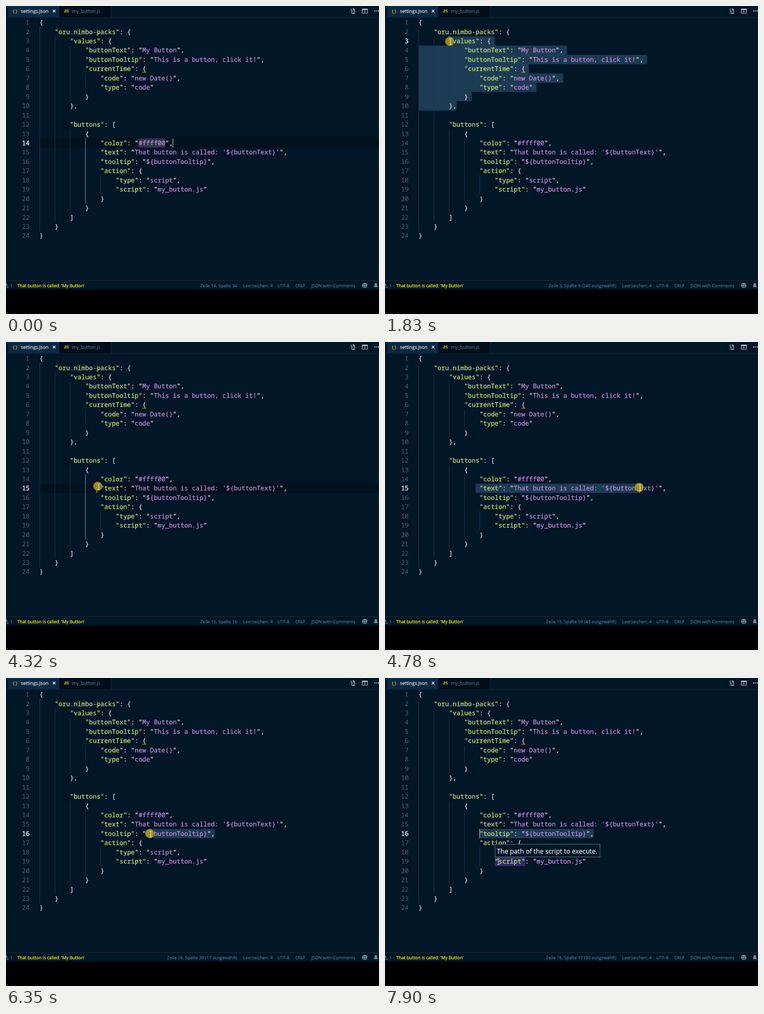
Animation, 825 px wide and 679 px high, one loop 8000 ms. Source, as an HTML page:

```html
<!DOCTYPE html>
<html lang="de">
<head>
<meta charset="utf-8">
<title>Editor</title>
<style>
html, body { margin: 0; width: 100%; height: 100%; overflow: hidden; background: #000; }
svg { display: block; }
text { white-space: pre; text-rendering: geometricPrecision; }
text, tspan { fill: currentColor; stroke: currentColor; stroke-width: .25px; }
.code { font: 14.05px "Noto Sans Mono", monospace; color: #dde5ee; }
.num { text-anchor: end; color: #4b6479; stroke-width: 0; }
.num.on { color: #e4f0fa; stroke-width: .45px; }
.key { color: #c5e478; }
.str { color: #cd89de; }
.quo { color: #e2f5e4; }
.ui { font: 9.75px "Open Sans", sans-serif; color: #5f7e97; stroke-width: .1px; }
.tab { font-size: 10.4px; }
.bright { stroke-width: .25px; }
.tip { font-size: 14.53px; color: #e6ecf2; }
</style>
</head>
<body>
<svg id="stage" width="825" height="679" viewBox="0 0 825 679"></svg>
<script>
const LOOP = 8000, X0 = 74, Y0 = 26, CW = 8.43, LH = 20.45;
const stage = document.getElementById('stage');

const source = `{
    "oru.nimbo-packs": {
        "values": {
            "buttonText": "My Button",
            "buttonTooltip": "This is a button, click it!",
            "currentTime": {
                "code": "new Date()",
                "type": "code"
            }
        },

        "buttons": [
            {
                "color": "#ffff00",
                "text": "That button is called: '\${buttonText}'",
                "tooltip": "\${buttonTooltip}",
                "action": {
                    "type": "script",
                    "script": "my_button.js"
                }
            }
        ]
    }
}`.split('\n');
const levels = source.map(s => s ? s.search(/\S/) / 4 : 2);

const colX = c => X0 + c * CW;
const lineY = n => Y0 + (n - 1) * LH;

function add(tag, attrs, parent = stage, content) {
  const el = document.createElementNS('http://www.w3.org/2000/svg', tag);
  for (const k in attrs) el.setAttribute(k, attrs[k]);
  if (content !== undefined) el.textContent = content;
  parent.appendChild(el);
  return el;
}
const rect = (x, y, width, height, fill, parent) => add('rect', { x, y, width, height, fill }, parent);
const label = (x, y, s, cls = 'ui', more = {}) => add('text', { x, y, class: cls, ...more }, stage, s);
const line = (d, stroke, w = 1, parent) =>
  add('path', { d, stroke, 'stroke-width': w, fill: 'none' }, parent);
const show = (el, on) => el.setAttribute('visibility', on ? 'visible' : 'hidden');

// Window and tabs
rect(0, 0, 825, 625, '#011627');
rect(0, 24.5, 825, 1, '#1c2737');
rect(5, 0, 113, 24.5, '#0b2942');
rect(118, 0, 114, 24.5, '#010e1a');
rect(232, 0, 1, 24.5, '#272b3b');
label(15, 14.5, '{ }', 'ui', { style: 'font-weight:600;color:#cbcb41' });
label(33, 15.3, 'settings.json', 'ui tab bright', { style: 'color:#dfe8ee' });
line('M103.6 8.4l5.6 5.6m0-5.6l-5.6 5.6', '#e4ebf0', 1.7);
label(128, 14.2, 'JS', '', { style: 'font:bold 9px "Liberation Sans",sans-serif;color:#e8d44d;stroke:none' });
label(146, 15.3, 'my_button.js', 'ui tab');
line('M765 7.5v8.5h6V8.5l-2.5-2.5H767', '#c5cdd3', 1.3);
line('M768.5 6v3h2.5', '#c5cdd3');
add('circle', { cx: 763.6, cy: 7.6, r: 1.6, fill: 'none', stroke: '#6fa8d8' });
line('M788 6.5h11.5v9.5H788zM793.7 6.5v9.5', '#c5cdd3', 1.2);
rect(788, 6, 11.5, 2.4, '#c5cdd3');
for (const x of [816, 820, 824]) add('circle', { cx: x, cy: 11, r: 1.3, fill: '#c5cdd3' });

// Editor
const rowMark = rect(75, 0, 750, LH, '#01111e');
const wordMark = rect(colX(26), lineY(14), 7 * CW, LH, '#2f3646');
const selection = add('path', { fill: '#1d3b53' });
const hoverMark = rect(colX(20), lineY(19), 8 * CW, LH, '#322c66');
levels.forEach((lev, i) => {
  for (let k = 0; k < lev; k++) rect(colX(k * 4), lineY(i + 1), 1, LH, '#1f385c');
});
const activeGuide = rect(0, 0, 1, 0, '#7e97ac');
rect(824, 26, 1, 579, '#1a2e40');

const numbers = source.map((s, i) => {
  const y = lineY(i + 1) + 15.1;
  const num = label(52.3, y, i + 1, 'code num');
  const row = label(colX(s.search(/\S|$/)), y, '', 'code');
  const span = (cls, str) => add('tspan', { class: cls }, row, str);
  for (const tok of s.trim().match(/"[^"]*":?|[^"]+/g) || []) {
    if (tok[0] !== '"') span('', tok);
    else if (tok.endsWith(':')) { span('key', tok.slice(0, -1)); span('', ':'); }
    else { span('quo', '"'); span('str', tok.slice(1, -1)); span('quo', '"'); }
  }
  return num;
});
line('M301.5 146.5q1.5-2 3 0t3 0t3 0', '#c3a23c', 1.1);
const caret = rect(0, 0, 1.4, LH, '#94b2cb');

// Status bar
rect(0, 605, 825, 1, '#262a39');
line('M-3 620.5L1 612.5L5 620.5zM1 615v3', '#5f7e97', 1.1);
label(9.5, 620, '1');
label(25, 620, "That button is called: 'My Button'", 'ui bright', { style: 'color:#ff0' });
const status = label(511.5, 620, '', 'ui', { 'text-anchor': 'end' });
label(524.5, 620, 'Leerzeichen: 4');
label(600.5, 620, 'UTF-8');
label(640, 620, 'CRLF');
label(675.5, 620, 'JSON with Comments');
add('circle', { cx: 793.5, cy: 616, r: 5.8, fill: '#7088a0' });
for (const x of [791.4, 795.6]) add('circle', { cx: x, cy: 614.5, r: 1, fill: '#011627' });
line('M790.3 617.3q3.2 4 6.4 0', '#011627', 1.1);
add('path', { d: 'M813 619.5q2-1.5 2-4.5q0-4 3-4t3 4q0 3 2 4.5zM816.5 620.3h3q-1.5 2-3 0z', fill: '#7088a0' });

// Hover box and pointer
const tip = add('g', {});
add('rect', { x: 243.5, y: 366.5, width: 232, height: 28, fill: '#011627', stroke: '#5f7e97' }, tip);
add('text', { x: 247.5, y: 387, class: 'ui tip bright' }, tip, 'The path of the script to execute.');
const pointer = add('g', {});
const press = add('circle', { cx: -2, cy: -1, r: 10, fill: '#a89a10', 'fill-opacity': .88 }, pointer);
const beam = line('M-3-6.5h2.2l.8.8l.8-.8H3M-3 6.5h2.2l.8-.8l.8.8H3M0-6V6', '#dfe5ea', 1.1, pointer);
const arrow = add('path', { d: 'M0 0V13l3-2.8l2 4.6l2-.9l-2-4.4h4z', fill: '#fff', stroke: '#000', 'stroke-width': .6 }, pointer);

// start, end, steps, target x, target y
const moves = [
  [290, 980, 10, 188, 222],
  [1300, 1370, 2, 157, 132],
  [1450, 1830, 6, 145, 79],
  [2000, 2460, 7, 277, 234],
  [3470, 4090, 9, 205, 319],
  [4400, 4860, 7, 653, 322],
  [5090, 5550, 7, 560, 357],
  [5630, 5870, 4, 492, 346],
  [5950, 5950, 1, 489, 345],
  [6200, 6500, 5, 228, 343],
  [6680, 6730, 2, 209, 343],
  [7130, 7440, 5, 245, 394],
  [7670, 7750, 2, 251, 405]
];
const presses = [[1150, 2000], [3320, 3470], [4320, 5090], [6120, 7060]];
const caretResets = [0, 1150, 1300, 1650, 3320, 4320, 4600, 4860, 6120, 6500, 6730];
const BLINK = 480, TIP_AT = 7820;

function mouseAt(t) {
  let x = 400, y = 700;
  for (const [t0, t1, n, tx, ty] of moves) {
    if (t < t0) break;
    const step = n > 1 ? Math.min(n, 1 + Math.floor((t - t0) / (t1 - t0) * (n - 1) + .02)) : 1;
    const p = step / n, e = p * p * (3 - 2 * p);
    x += (tx - x) * e;
    y += (ty - y) * e;
  }
  return { x, y };
}

function cellAt({ x, y }) {
  const n = Math.max(1, Math.min(source.length, 1 + Math.floor((y - Y0) / LH)));
  const c = Math.max(0, Math.min(source[n - 1].length, Math.floor((x - X0) / CW + .45)));
  return { n, c };
}

// Draws the selected rows and returns the number of characters
function select(a, b) {
  const [s, e] = a.n < b.n || (a.n === b.n && a.c <= b.c) ? [a, b] : [b, a];
  let d = '', count = 0;
  for (let n = s.n; n <= e.n; n++) {
    const last = n === e.n;
    const from = n === s.n ? s.c : 0;
    const to = last ? e.c : source[n - 1].length;
    count += to - from + (last ? 0 : 2);
    const w = (to - from + (last ? 0 : 1)) * CW;
    if (w > 0) {
      d += `M${colX(from)} ${lineY(n)}h${w - 3}q3 0 3 3v${LH - 6}q0 3-3 3h${3 - w}z`;
    }
  }
  selection.setAttribute('d', d);
  return count;
}

function markGuide(n) {
  const lev = levels[n - 1];
  let a = n, b = n;
  while (a > 1 && levels[a - 2] >= lev) a--;
  while (b < levels.length && levels[b] >= lev) b++;
  activeGuide.setAttribute('x', colX((lev - 1) * 4));
  activeGuide.setAttribute('y', lineY(a));
  activeGuide.setAttribute('height', (b - a + 1) * LH);
}

function render(t) {
  const m = mouseAt(t);
  const hit = presses.filter(p => p[0] <= t).pop();
  const anchor = hit ? cellAt(mouseAt(hit[0])) : { n: 14, c: 35 };
  const cur = hit ? cellAt(mouseAt(Math.min(t, hit[1] - 1))) : anchor;
  const count = select(anchor, cur);

  show(rowMark, !count);
  show(activeGuide, !count);
  rowMark.setAttribute('y', lineY(cur.n));
  markGuide(cur.n);
  show(wordMark, !hit);
  numbers.forEach((el, i) => el.classList.toggle('on', i + 1 === cur.n));
  status.textContent = `Zeile ${cur.n}, Spalte ${hit ? cur.c + 1 : 34}` +
    (count ? ` (${count} ausgewählt)` : '');

  const reset = caretResets.filter(r => r <= t).pop();
  caret.setAttribute('x', colX(cur.c) - .4);
  caret.setAttribute('y', lineY(cur.n));
  show(caret, Math.floor((t - reset) / BLINK) % 2 === 0);

  show(tip, t >= TIP_AT);
  show(hoverMark, t >= TIP_AT);
  pointer.setAttribute('transform', `translate(${m.x} ${m.y})`);
  show(press, hit && t < hit[1]);
  show(beam, m.y < 605);
  show(arrow, m.y >= 605);
}

const begin = performance.now();
function tick() {
  render((performance.now() - begin) % LOOP);
  requestAnimationFrame(tick);
}
tick();
</script>
</body>
</html>
```
